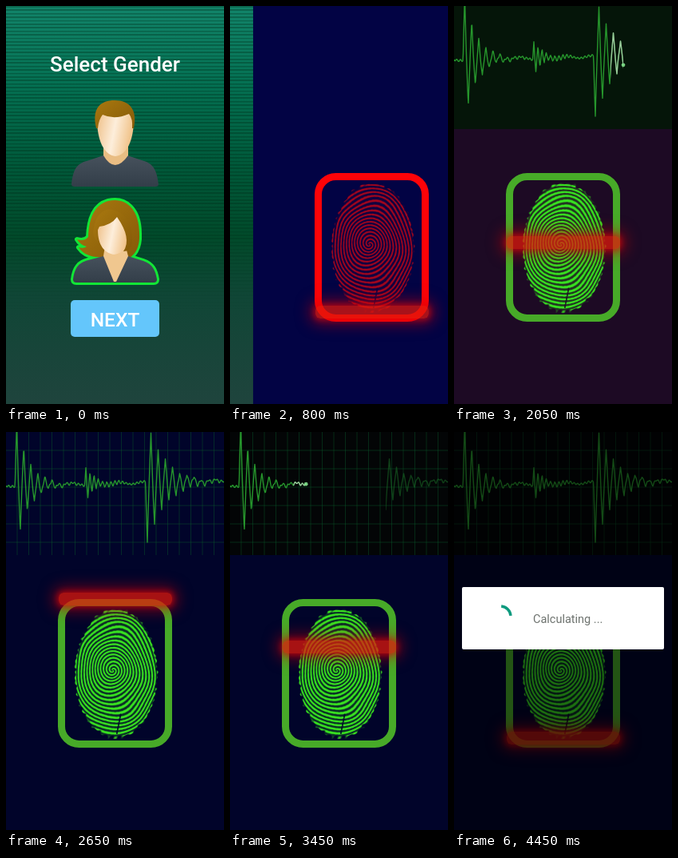
Recreate the animation shown at these times as an HTML page with a canvas. Size 273 by 498 pixels, loop 4500 ms.

```html
<!DOCTYPE html>
<html lang="en">
<head>
<meta charset="utf-8">
<title>Fingerprint scan</title>
<style>
  html, body { margin: 0; width: 100%; height: 100%; overflow: hidden; background: #01033a; }
  #stage { position: absolute; left: 0; top: 0; width: 273px; height: 498px; overflow: hidden; }
  #stage > div, #stage > svg, #scan svg { position: absolute; left: 0; top: 0; }
  #gender, #scan, #dim { width: 273px; height: 498px; isolation: isolate; }
  #gender { background: linear-gradient(#12846a, #047052 20%, #00593a 40%, #014a2a 58%, #104636 73%, #1f443d); }
  #gender::after { content: ""; position: absolute; inset: 0 0 118px;
    background: repeating-linear-gradient(rgba(0,45,25,.34) 0 1.4px, transparent 2px 4.4px);
    -webkit-mask: linear-gradient(#000 65%, transparent); mask: linear-gradient(#000 65%, transparent); }
  #gender svg { position: relative; z-index: 1; }
  text { font-family: Roboto, Arial, sans-serif; }
  #back { position: absolute; left: -12px; top: 0; width: 297px; height: 498px; }
  #print { position: absolute; left: 83px; top: 219px; width: 110px; height: 166px; }
  #bar { position: absolute; left: 66px; top: -8px; width: 142px; height: 16px; border-radius: 6px;
    background: rgba(226,24,12,.74);
    box-shadow: 0 0 7px 2px rgba(225,8,8,.55), 0 0 18px 7px rgba(215,0,10,.5); }
  #dim { background: #000; }
</style>
</head>
<body>
<div id="stage">
  <div id="gender">
    <svg width="273" height="498">
      <defs>
        <linearGradient id="skin" x1="0" x2="1" y1="0" y2=".25">
          <stop offset="0" stop-color="#eebd83"/><stop offset=".55" stop-color="#fdeedb"/><stop offset="1" stop-color="#f1c48c"/>
        </linearGradient>
        <linearGradient id="hair" x1="0" x2="1" y1="0" y2="1">
          <stop offset="0" stop-color="#a9780f"/><stop offset="1" stop-color="#855a08"/>
        </linearGradient>
        <linearGradient id="suit" x1="0" x2="0" y1="0" y2="1">
          <stop offset="0" stop-color="#46515c"/><stop offset="1" stop-color="#333e49"/>
        </linearGradient>
        <path id="locks" d="M128 244C150 239 167 254 167 285C168 304 160 314 150 317L113 314C102 313 95 308 91 302Q97 304 101 301Q93 299 89 292Q98 295 103 289C104 266 110 249 128 244Z"/>
        <path id="jacket" d="M84 342C86 326 92 321 103 318L122 313H153L172 319C184 323 187 331 189 342Q189 346 185 346H88Q84 346 84 342Z"/>
      </defs>
      <text x="136.5" y="82" font-size="26" font-weight="500" fill="#fff" text-anchor="middle">Select Gender</text>

      <path fill="url(#suit)" d="M82 223C84 204 89 197 101 194L122 187H152L173 194C186 198 189 208 191 223Q191 226 187 226H86Q82 226 82 223Z"/>
      <path fill="#e9bd83" d="M122 172V187Q136 211 153 187V172Z"/>
      <path fill="url(#skin)" d="M114 142Q115 126 137 126Q158 126 160 142C160 168 151 187 137 188C123 187 114 168 114 142Z"/>
      <path fill="url(#hair)" d="M113 153C107 127 119 118 136 118C155 118 165 130 160 153H158Q159 141 154 135Q136 143 121 136Q116 142 115 153Z"/>

      <g fill="none" stroke="#12e636" stroke-width="6" stroke-linejoin="round">
        <use href="#locks"/><use href="#jacket"/>
      </g>
      <use href="#locks" fill="url(#hair)"/>
      <use href="#jacket" fill="url(#suit)"/>
      <path fill="#f0c78f" d="M124 300L122 313L135 345H138L153 313L149 298Z"/>
      <path fill="url(#skin)" d="M115 280Q114 270 124 268L140 262Q154 272 154 285C154 303 145 310 135 311C123 309 115 299 115 280Z"/>
      <path fill="url(#hair)" d="M110 277C113 258 126 251 137 256C150 260 160 275 158 297Q155 307 147 307Q158 291 139 264Q132 274 117 276Q112 284 115 295Q107 290 110 277Z"/>

      <rect x="81" y="368" width="111" height="46" rx="5" fill="#64c6fb"/>
      <text x="136.5" y="401" font-size="24.5" font-weight="500" fill="#fff" text-anchor="middle">NEXT</text>
    </svg>
  </div>

  <div id="scan">
    <div id="back"></div>
    <canvas id="print" width="220" height="332"></canvas>
    <svg width="273" height="498">
      <rect id="frame" x="69.5" y="213.5" width="134" height="177" rx="22" fill="none" stroke-width="9"/>
    </svg>
    <div id="bar"></div>
    <svg id="ecg" width="273" height="154">
      <defs>
        <clipPath id="cutNew"><rect id="newBox" y="-10" height="170"/></clipPath>
        <clipPath id="cutTip"><rect id="tipBox" y="-10" width="16" height="170"/></clipPath>
        <clipPath id="cutOld"><rect id="oldBox" y="-10" width="400" height="170"/></clipPath>
      </defs>
      <rect id="panel" width="273" height="154"/>
      <path id="grid" fill="none" stroke="#0a5a2c"/>
      <g fill="none" stroke-linejoin="round" stroke-width="1.4">
        <g clip-path="url(#cutOld)"><path class="wave" id="old" stroke="#1c7a2a"/></g>
        <g clip-path="url(#cutNew)"><path class="wave" stroke="#26962c"/></g>
        <g clip-path="url(#cutTip)"><path class="wave" id="tip" stroke="#c4dcc4"/></g>
      </g>
      <circle id="head" r="2.4" fill="#7fe08a"/>
    </svg>
  </div>

  <div id="dim"></div>
  <svg id="dialog" width="273" height="498">
    <rect x="10" y="194" width="253" height="78" rx="2" fill="#fff"/>
    <path id="spin" d="M59.2 218A13 13 0 0 1 71 229.9" fill="none" stroke="#0d9a7e" stroke-width="3.4"/>
    <text x="99" y="239" font-size="14.5" fill="#6e736f">Calculating ...</text>
  </svg>
</div>

<script>
const LOOP = 4500, STEP = 50, WIDTH = 273;
const $ = id => document.getElementById(id);
const clamp = v => Math.min(1, Math.max(0, v));
const ramp = (t, from, to) => clamp((t - from) / (to - from));
const mix = (a, b, p) => a.map((v, i) => v + (b[i] - v) * p);
const rgb = c => `rgb(${c.map(Math.round)})`;
const set = (id, attrs) => { for (const k in attrs) $(id).setAttribute(k, attrs[k]); };

const NAVY = [2, 3, 68], NIGHT = [1, 4, 42], PURPLE = [29, 10, 36];
const MOSS = [5, 21, 9], BLACK = [3, 5, 6];
const RED = [160, 6, 30], GREEN = [56, 224, 32];

// Whorl of ridges: a spiral phase in a stretched polar space
const canvas = $('print'), pen = canvas.getContext('2d');
function drawPrint(color, gap, base) {
  const img = pen.createImageData(canvas.width, canvas.height);
  for (let py = 0; py < canvas.height; py++) for (let px = 0; px < canvas.width; px++) {
    const u = px / 2 - 54.5, v = py / 2 - 83;
    const dx = u + 4, dy = v + 4;
    const stretch = 1 + .3 * clamp(Math.hypot(dx, dy) / 60);
    const r = Math.hypot(dx, dy / stretch);
    const bend = 1.6 * Math.sin(u * .09 + v * .05) + 1.3 * Math.sin(v * .11 - u * .06);
    const ridge = Math.cos(r * 2 * Math.PI / 3.7 - 2 * Math.atan2(dy, dx) + bend * clamp(r / 15));
    const grain = Math.sin(u * .83 + v * .31) * Math.sin(v * .67 - u * .47);
    const rim = (u / 52) ** 2 + (v / 81) ** 2 + .03 * Math.sin(v * .9) + .03 * Math.sin(u * .7 + v * .3);
    const ink = clamp((ridge - gap - .3 * clamp(grain)) * 1.1 + .5);
    const crease = Math.abs(v - 63) < 13 && Math.abs(u - 3.5 + (v - 63) * .2) < 1 ? .2 : 1;
    const alpha = (base + (1 - base) * ink) * crease * clamp((1 - rim) * 18);
    img.data.set([...color, alpha * 255], (py * canvas.width + px) * 4);
  }
  pen.putImageData(img, 0, 0);
}

// Each beat is a triangle wave that dies away; negative size starts upwards
function beat(x, start, size, gap, decay) {
  const d = (x - start) / gap;
  return d < -.5 ? 0 : size * decay ** d * Math.asin(Math.cos(Math.PI * d)) * 2 / Math.PI;
}
const waveY = x => 67 - x * .02 + 1.4 * Math.sin(x * .21) + 1.3 * Math.sin(x * 1.37)
  + beat(x, 13.5, -78, 4.4, .76) + beat(x, 177, 76, 4.5, .82) + beat(x, 100, -20, 2.6, .84);

let wave = '', lines = '';
for (let x = 0; x <= WIDTH; x += .5) wave += `${x ? 'L' : 'M'}${x} ${waveY(x).toFixed(1)}`;
for (let x = 14; x < WIDTH; x += 14.5) lines += `M${x} 0V154`;
for (let y = 23; y < 154; y += 23) lines += `M0 ${y}H${WIDTH}`;
document.querySelectorAll('.wave').forEach(p => p.setAttribute('d', wave));
$('grid').setAttribute('d', lines);

function drawEcg(t) {
  $('ecg').style.display = t < 1500 ? 'none' : '';
  const again = t >= 2950;
  const x = (t - (again ? 3212 : 1520)) * .4;
  const live = x > 0 && x < WIDTH;
  const night = mix(MOSS, NIGHT, ramp(t, 2100, 2400));
  set('panel', { fill: rgb(mix(night, BLACK, ramp(t, 2850, 3100))) });
  set('grid', { opacity: .45 * ramp(t, 2100, 2400) });
  set('newBox', { width: Math.max(0, x) });
  set('tipBox', { x: x - 16 });
  set('tip', { opacity: live ? .75 : 0 });
  set('oldBox', { x: x + 100 });
  set('old', { opacity: again ? 1 - .5 * ramp(x, -100, 95) : 0 });
  set('head', { cx: x, cy: waveY(x), opacity: live ? .9 : 0 });
}

let matched;
function paint(t) {
  const slide = (1 - ramp(t, 600, 1020)) ** 3;
  $('scan').style.transform = `translateX(${285 * slide}px)`;
  $('scan').style.visibility = t < 600 ? 'hidden' : 'visible';
  const flash = clamp(2 - Math.abs(t - 2050) / 150);
  $('back').style.background = rgb(mix(mix(NAVY, NIGHT, ramp(t, 1000, 2400)), PURPLE, flash));

  if (matched !== t >= 1150) {
    matched = t >= 1150;
    if (matched) drawPrint(GREEN, -.1, .2); else drawPrint(RED, .1, .1);
    set('frame', { stroke: matched ? '#47aa28' : '#fd0308' });
  }
  const lift = ramp(t, 1450, 2650) - ramp(t, 3036, 4236);
  $('bar').style.transform = `translateY(${383 - 174 * lift}px)`;
  drawEcg(t);

  const shown = ramp(t, 4150, 4250);
  $('dim').style.opacity = .5 * shown;
  $('dialog').style.opacity = shown;
  set('spin', { transform: `rotate(${(t - 4450) * .36} 58 231)` });
}

function tick() {
  paint(Math.floor(performance.now() % LOOP / STEP) * STEP);
  requestAnimationFrame(tick);
}
tick();
</script>
</body>
</html>
```
